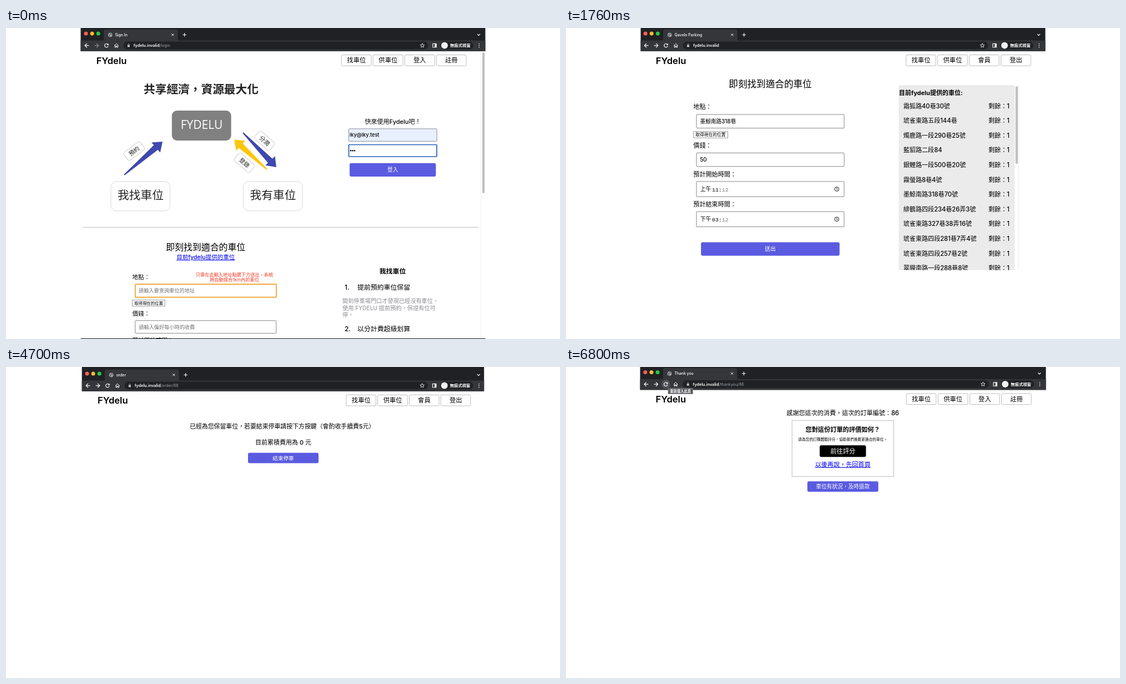
Write an HTML page that moves like this. It is 998 px wide and 561 px high and loops after 8000 ms.

```html
<!DOCTYPE html>
<html lang="zh-Hant">
<head>
<meta charset="utf-8">
<title>Parking demo</title>
<style>
html, body { margin: 0; width: 100%; height: 100%; overflow: hidden; background: #fff; }
svg { display: block; width: 100vw; height: 100vh; }
text { font-family: Inter, "Noto Sans CJK TC", "Noto Sans CJK JP", "Noto Sans CJK", sans-serif; white-space: pre; }
.open { font-family: "Open Sans", "Noto Sans CJK TC", sans-serif; }
.mono { font-family: "Liberation Mono", monospace; }
</style>
</head>
<body>
<svg id="stage" viewBox="0 0 998 561" preserveAspectRatio="none" xmlns="http://www.w3.org/2000/svg"></svg>
<script>
const BLUE = '#5a5be0', LINK = '#0000ee', GREY = '#757575';
const BRAND = 'FYdelu', HOST = 'fydelu.invalid';

// y is the vertical middle of the glyphs
const text = (x, y, s, size, o = {}) =>
  `<text x="${x}" y="${(y + size * .37).toFixed(2)}" font-size="${size}" fill="${o.fill || '#000'}"` +
  ` text-anchor="${o.at || 'start'}" font-weight="${o.w || 500}" class="${o.cls || ''}"` +
  (o.line ? ' text-decoration="underline"' : '') + `>${s}</text>`;
const mid = (x, y, s, size, o = {}) => text(x, y, s, size, { at: 'middle', ...o });
const box = (x1, y1, x2, y2, fill, stroke = 'none', r = 0, w = 1) =>
  `<rect x="${x1}" y="${y1}" width="${x2 - x1}" height="${y2 - y1}" rx="${r}" fill="${fill}" stroke="${stroke}" stroke-width="${w}"/>`;
const dot = (x, y, r, fill) => `<circle cx="${x}" cy="${y}" r="${r}" fill="${fill}"/>`;
const path = (d, stroke, w = 1, fill = 'none') =>
  `<path d="${d}" fill="${fill}" stroke="${stroke}" stroke-width="${w}"/>`;
const shape = (d, fill) => path(d, 'none', 0, fill);
const at = (x, y, s, turn = 0) => `<g transform="translate(${x} ${y}) rotate(${turn})">${s}</g>`;
const button = (x1, y1, x2, y2, s, size, fill = BLUE) =>
  box(x1, y1, x2, y2, fill, 'none', 3) + mid((x1 + x2) / 2, (y1 + y2) / 2, s, size, { fill: '#fff' });
const field = (x1, y1, x2, y2, s = '', size = 9.7, o = {}) =>
  box(x1, y1, x2, y2, '#fff', '#858585', 1) + text(x1 + 6.5, (y1 + y2) / 2, s, size, o);
const HINT = { fill: GREY, w: 400 };

function star(r) {
  const p = [];
  for (let i = 0; i < 10; i++) {
    const a = Math.PI * (i / 5 - .5), k = i % 2 ? r * .45 : r;
    p.push((k * Math.cos(a)).toFixed(2) + ',' + (k * Math.sin(a)).toFixed(2));
  }
  return `<polygon points="${p.join(' ')}" fill="none" stroke="#fff" stroke-width=".8"/>`;
}

const arrowLeft = c => path('M3.8 0H-3.4M.3 -3.7L-3.4 0L.3 3.7', c, 1.2);

// Browser bar: l/r edges, dx shifts the left icons, rx the right ones
function browser({ l, r, dx, rx = 0, dy = 0, title, url = '', fwd = '#fff', hot }) {
  const y = 31.6 + dy, X = n => n + dx, Z = n => n + rx, ty = 12 + dy;
  const tab = `M${X(173)} ${23 + dy}q3 0 3 -3V${6 + dy}q0 -3.5 3.5 -3.5H${X(306)}q3.5 0 3.5 3.5V${20 + dy}q0 3 3 3z`;
  return box(l, 0, r, 41.8 + dy, '#202124') + box(l, 22.5 + dy, r, 41.8 + dy, '#35363a') +
    shape(tab, '#35363a') +
    ['#ff5f57', '#febc2e', '#28c840'].map((c, i) => dot(X(144 + i * 11.1), 10.1 + dy, 3.5, c)).join('') +
    at(X(187.7), ty + .3, dot(0, 0, 3.9, '#a0a4a9') + path('M-2.8 -.8L-.8 .2L-1.5 2.6M.2 -3L.6 -1L3 -.6', '#35363a', 1)) +
    text(X(196.4), ty, title, 6.9, { fill: '#fff' }) +
    at(X(300.3), ty + .2, path('M-2 -2L2 2M2 -2L-2 2', '#fff', 1)) +
    at(X(321.6), ty + .2, path('M-3.3 0H3.3M0 -3.3V3.3', '#fff', 1.1)) +
    at(Z(851.6), ty + .2, path('M-2.5 -1.2L0 1.3L2.5 -1.2', '#fff', 1.1)) +
    (hot ? dot(X(181), y, 8, '#505155') : '') +
    at(X(145.6), y, arrowLeft('#fff')) + at(X(163.4), y, arrowLeft(fwd), 180) +
    at(X(181), y, path('M2.5 -2.2A3.3 3.3 0 1 0 3.2 .8', '#fff', 1.2) + shape('M3.7 -3.8V-.5H.4z', '#fff')) +
    at(X(198.8), y, path('M-3.7 .2L0 -3.4L3.7 .2M-2.6 -.6V3.3H-.9V.9H.9V3.3H2.6V-.6', '#fff', 1)) +
    box(X(211.5), y - 7, Z(760.5), y + 7, '#202124', 'none', 7) +
    at(X(220.9), y, box(-2, -.9, 2, 2.7, '#c4c7cb', 'none', .4) + path('M-1.2 -.8V-1.8A1.2 1.2 0 0 1 1.2 -1.8V-.8', '#c4c7cb', .8)) +
    text(X(229.8), y, `${HOST}<tspan fill="#9aa0a6" font-weight="400">${url}</tspan>`, 7.2, { fill: '#fff', w: 600 }) +
    at(Z(750), y, star(4)) +
    at(Z(772), y, box(-3.2, -3.2, 3.2, 3.2, 'none', '#fff', .4, 1.1) + box(.4, -3.2, 3.2, 3.2, '#fff')) +
    box(Z(782.5), y - 7, Z(842), y + 7, '#202124', 'none', 7) + dot(Z(790), y, 6, '#f1f3f4') +
    text(Z(800), y, '無痕式視窗', 7.35, { fill: '#fff', w: 700 }) +
    [-3, 0, 3].map(k => dot(Z(852.3), y + k, .8, '#fff')).join('');
}

const GUEST = ['找車位', '供車位', '登入', '註冊'], MEMBER = ['找車位', '供車位', '會員', '登出'];
const header = (bx, y, nx, items, step = 57) =>
  text(bx, y, BRAND, 16.6, { w: 600 }) +
  items.map((s, i) => box(nx + i * step, y - 10, nx + 53.7 + i * step, y + 9.7, '#fff', '#bdbdbd', 2) +
    mid(nx + 27 + i * step, y - .3, s, 11.3)).join('');

const scrollbar = (y1, y2) => path('M855.9 43V561', '#ececec') + box(858, y1, 862.3, y2, '#c1c1c1', 'none', 2);

function arrow(x1, y1, x2, y2, fill) {
  const n = Math.hypot(x2 - x1, y2 - y1), a = Math.atan2(y2 - y1, x2 - x1) * 180 / Math.PI;
  return at(x1, y1, shape(`M0 -1L${n - 16} -5.5V-12L${n} 0L${n - 16} 12V5.5L0 1z`, fill), a);
}
const tag = (x, y, s, turn) =>
  at(x, y, box(-18.5, -9, 18.5, 9, '#fff', '#cfcfcf', 4) + mid(0, 0, s, 10.4, { fill: '#222' }), turn);
const node = (x, s) => box(x, 277, x + 106.5, 330, '#fff', '#d8d8d8', 10) + mid(x + 53.5, 301.5, s, 20.7, { fill: '#222', w: 400 });

function login() {
  const ink = '#3f48b0', red = { fill: '#f2371f', w: 400 }, soft = { fill: '#8d8d93', w: 400 };
  return header(162.8, 58.5, 604.3, GUEST) + scrollbar(44, 298) +
    mid(351.5, 110.5, '共享經濟，資源最大化', 20.7, { w: 700, fill: '#222' }) +
    box(298.8, 149, 405.6, 203, '#808080', 'none', 9) +
    mid(352.5, 174, BRAND.toUpperCase(), 21, { fill: '#fff', cls: 'open', w: 400 }) +
    node(189, '我找車位') + node(427.5, '我有車位') +
    arrow(213, 265, 282, 205, ink) + arrow(427, 189, 487, 251, ink) + arrow(470, 255, 411, 201.5, '#fcc60b') +
    tag(230.8, 222, '預約', -37) + tag(465.7, 203.5, '分潤', 41) + tag(429.5, 243, '登錄', 41) +
    mid(697, 168.5, '快來使用Fydelu吧！', 11) +
    box(617.3, 181.8, 776.2, 204.3, '#e8f0fe', '#8a8f99', 1) + text(619, 193, 'lky@lky.test', 9.2) +
    box(617.5, 210.5, 776, 232, '#fff', '#1f62bd', 1, 1.7) +
    [0, 1, 2].map(i => dot(621 + i * 3.5, 221.3, 1.3, '#000')).join('') +
    button(619, 243.7, 774.4, 268, '登入', 9.8) +
    path('M138 359.5H851.5', '#bdbdbd') +
    mid(359.7, 395.3, '即刻找到適合的車位', 15.9) +
    mid(359.7, 413.3, '目前fydelu提供的車位', 10.5, { fill: LINK, line: true }) +
    text(227.5, 449.5, '地點：', 10.6) +
    mid(411.5, 444.6, '只需在此輸入地址點選下方送出，系統', 8.2, red) +
    mid(411.5, 454.3, '將自動媒合1km內的車位', 8.2, red) +
    box(232.8, 462.2, 487, 485.7, '#fff', '#f0a02c', 1, 1.7) +
    text(239, 474, '請輸入要查詢車位的地址', 9.2, HINT) +
    box(227.5, 490.7, 286.3, 501.8, '#fff', '#9a9a9a', 0) + mid(257, 496.3, '取得現在的位置', 7.4) +
    text(227.5, 515, '價錢：', 10.6) +
    field(232.7, 527.8, 486.7, 550.7, '請輸入偏好每小時的收費', 9.2, HINT) +
    text(227.5, 563, '預計開始時間：', 10.6) +
    mid(696.5, 438.7, '我找車位', 11.9, { w: 700 }) +
    text(610, 467.7, '1.', 11.9) + text(633, 467.7, '提前預約車位保留', 11.9) +
    text(606, 492.6, '開到停車場門口才發現已經沒有車位，', 10.2, soft) +
    text(606, 505.2, `使用 ${BRAND.toUpperCase()} 提前預約，保證有位可`, 10.2, soft) +
    text(606, 517.6, '停。', 10.2, soft) +
    text(610, 543, '2.', 11.9) + text(633, 543, '以分計費超級划算', 11.9) +
    box(134.5, 560, 863.5, 561, '#111');
}

const SPOTS = ['霜狐路40巷30號', '琥雀東路五段144巷', '燭鹿路一段290巷25號', '藍貂路二段84', '銀鯉路一段500巷20號',
  '霧螢路8巷4號', '墨鯨南路318巷70號', '緋鶴路四段234巷26弄3號', '琥雀東路327巷38弄16號',
  '琥雀東路四段281巷7弄4號', '琥雀東路四段257巷2號', '翠貘南路一段288巷8號'];

function search() {
  const label = (y, s) => text(229.3, y, s, 11.1);
  const time = (y, half, hour) => field(235, y - 13.7, 501, y + 13.7) + text(242, y, half, 9.7) +
    text(263, y + .3, `${hour}:<tspan fill="#757575">12</tspan>`, 9.9, { cls: 'mono', w: 400 }) +
    at(487.8, y, `<circle r="3.8" fill="none" stroke="#111"/>` + path('M0 -2.3V.2L1.8 1.3', '#111', .9));
  return header(161.8, 58.5, 612.5, MEMBER) +
    mid(368, 101.3, '即刻找到適合的車位', 16.6) +
    label(142.3, '地點：') + field(235, 156, 501, 180.6, '墨鯨南路318巷') +
    box(229.5, 186.7, 291.5, 198.2, '#fff', '#9a9a9a') + mid(260.5, 192.5, '取得現在的位置', 7.75) +
    label(211.5, '價錢：') + field(235, 225.3, 501, 249.8, '50') +
    label(263.5, '預計開始時間：') + time(290.6, '上午', '11') +
    label(317.8, '預計結束時間：') + time(344.9, '下午', '03') +
    button(243.2, 386.5, 492.8, 410.8, '送出', 9.8) +
    `<g clip-path="url(#panel)">` + box(599.4, 103, 808.3, 437, '#ebebeb') +
    text(599.8, 117, '目前fydelu提供的車位:', 11, { w: 700 }) +
    SPOTS.map((s, i) => text(607.7, 140.5 + i * 26.6, s, 11.1) + text(761, 140.5 + i * 26.6, '剩餘：1', 11.1)).join('') +
    path('M815.5 103V437', '#ececec') + '</g>' + box(809.7, 105, 814, 245, '#c1c1c1', 'none', 2);
}

const fade = (id, a, b) => `<linearGradient id="${id}" x2="0" y2="1"><stop stop-color="${a}"/><stop offset="1" stop-color="${b}"/></linearGradient>`;

// Car park picture, 172 by 128.5
function carPark() {
  const beam = 'M0 35.5L104 29.5L172 33';
  let s = fade('wall', '#b9beb9', '#dcddd9') + fade('floor', '#dddad6', '#c9c6c3') + fade('lane', '#b4c6cd', '#93afbc') +
    box(0, 0, 172, 56, 'url(#wall)') + box(0, 50, 172, 129, 'url(#floor)') +
    shape('M0 0H58L104 10V29L0 35z', '#d5d7d3') +
    shape('M0 37L104 31V46L0 60z', '#dfdeda') + shape('M104 31L172 35V61L104 46z', '#cfd0cd') +
    path('M58 0L106 9.5L172 6M96 0L126 7', '#9da49f', .8) +
    path('M104 5L128 2.5M112 18L134 16', '#fafcfa', 2.6) +
    path(beam, '#4b3a3d', 3.8) +
    `<path d="${beam}" fill="none" stroke="#d9d2cf" stroke-width="2.2" stroke-dasharray="2.5 4.5"/>` +
    shape('M48 128.5L172 63V128.5z', 'url(#lane)') +
    path('M0 84L152 72M52 53L146 78M8 62L104 100M80 48L165 63', '#f0efec', 1.1) +
    path('M46 128.5L172 63', '#e6cd26', 3);
  for (let i = 0; i < 6; i++) s += at(5 + i * 18, 61.5 - i * 2.7, box(-4, -1, 4, 1, '#dcc63c'), -9);
  const number = (x, y, n, size) => `<g transform="translate(${x} ${y}) rotate(-17) skewX(-22) scale(1.25 .85)">` +
    mid(0, 0, n, size, { fill: '#5c5a5a' }) + '</g>';
  return s + number(53, 108, '209', 18) + number(124, 79, '208', 9.5) + number(157, 65, '207', 7);
}

const OFFERS = [
  ['霜狐路40巷30號', '0.62', '16:00', '64.9000', 2],
  ['墨鯨南路318巷70號', '0.09', '23:59', '65.2143', 5],
  ['緋鶴路四段234巷26弄3號', '0.28', '17:00', '65.7500', 1],
  null];

function booking() {
  const card = (o, i) => at(0, i * 152.3,
    box(226.5, 77.2, 762.8, 223.5, '#fff', '#bdbdbd', 3) +
    '<use href="#photo" x="227" y="77.7"/>' +
    (o ? mid(487.2, 113, o[0], 10.9) + mid(487.2, 141.5, `距離 ${o[1]} km`, 10.9) +
      mid(487.2, 170.3, `可以停到 ${o[2]}`, 10.9) +
      mid(663.8, 112.2, `過去10筆訂單平均成交價為${o[3]}`, 10.8) + mid(663.8, 140, '71/hr', 10.8) +
      button(622.5, 160.2, 705.5, 179, '開始保留車位', 9.6) +
      text(228.8, 214.8, `${o[4]}則評價 平均 5.00 顆星`, 10) : ''));
  return header(162.8, 60, 604.5, MEMBER) + scrollbar(45, 232.5) + OFFERS.map(card).join('');
}

const order = () => header(165, 60.3, 612.8, MEMBER, 56.8) +
  text(331, 107, '已經為您保留車位，若要結束停車請按下方按鍵（會酌收手續費5元）', 10.9) +
  mid(499.5, 136.2, '目前累積費用為 0 元', 11) +
  button(436, 154.8, 563, 173.6, '結束停車', 9.6);

const thanks = () => header(161.5, 58, 613, GUEST, 57.2) +
  box(184, 38.2, 228.4, 48.6, '#5a5c60', '#85878a', 0, .7) +
  mid(206.2, 43.4, '重新載入此頁', 6.3, { fill: '#fff', w: 700 }) +
  mid(498.6, 83, '感謝您這次的消費，這次的訂單編號：86', 11.1) +
  box(407.2, 96.6, 590.4, 197.6, '#fff', '#bdbdbd') +
  mid(498.6, 113, '您對這份訂單的評價如何？', 11.2, { w: 700 }) +
  mid(498.6, 131, '請為您的訂購體驗評分，協助我們推薦更適合的車位。', 6.7) +
  button(457, 141.2, 540.4, 162.3, '前往評分', 11.2, '#000') +
  mid(498.6, 175.5, '以後再說，先回首頁', 11.1, { fill: LINK, line: true }) +
  button(434.8, 206.2, 562.6, 225, '車位有狀況，及時退款', 9.7);

const SCENES = [
  [500, { l: 134.5, r: 863.5, dx: 0, title: 'Sign In', url: '/login', fwd: '#8b8c8f' }, login],
  [2600, { l: 134.5, r: 863.5, dx: -.9, title: 'Qavelo Parking' }, search],
  [4700, { l: 134.5, r: 863.5, dx: .2, dy: 1.7, rx: .3, title: 'Booking', url: '/booking' }, booking],
  [6800, { l: 136.7, r: 861.2, dx: 2, dy: 2, rx: -.3, title: 'order', url: '/order/86' }, order],
  [8000, { l: 133.5, r: 864.5, dx: -1.2, dy: -.5, rx: 1.2, title: 'Thank you', url: '/thankyou/86', hot: true }, thanks]];

const stage = document.getElementById('stage');
stage.innerHTML = `<defs><clipPath id="panel"><rect x="599" y="103" width="218" height="333.7"/></clipPath>
  <clipPath id="round"><rect width="172" height="128.5" rx="3"/></clipPath>
  <g id="photo" clip-path="url(#round)">${carPark()}</g></defs>` +
  SCENES.map(([, bar, page]) => `<g class="scene" display="none">${browser(bar)}${page()}</g>`).join('');
const groups = stage.querySelectorAll('.scene');

let shown = -1;
function draw() {
  const t = performance.now() % 8000, now = SCENES.findIndex(s => t < s[0]);
  if (now !== shown) {
    groups.forEach((g, i) => g.setAttribute('display', i === now ? 'inline' : 'none'));
    shown = now;
  }
  requestAnimationFrame(draw);
}
draw();
</script>
</body>
</html>
```
